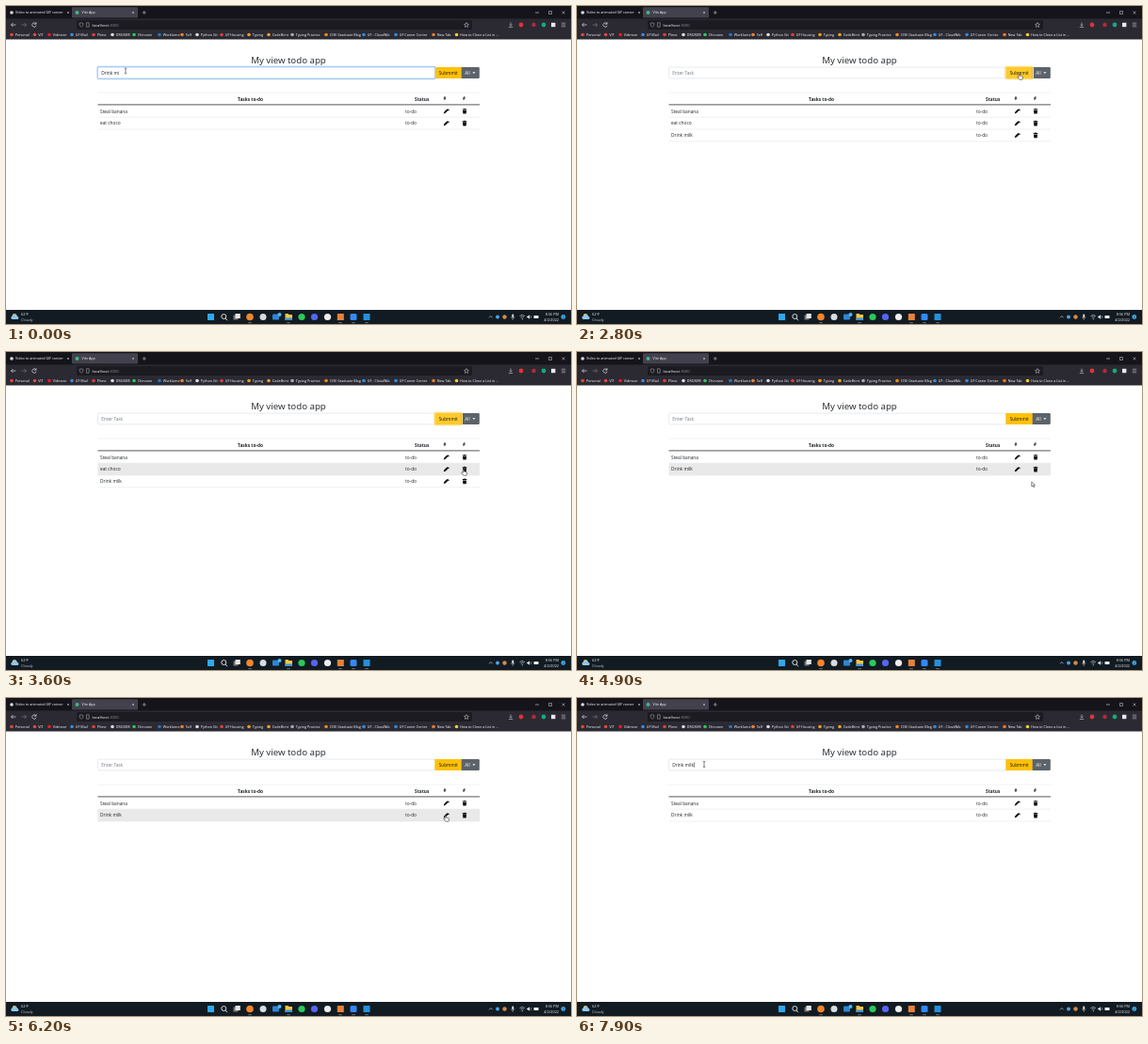
Recreate the animation shown at these times as an HTML page. Size 600 px wide and 338 px high, loop 8000 ms.

```html
<!DOCTYPE html>
<html lang="en">
<head>
<meta charset="utf-8">
<title>Todo app</title>
<style>
html, body { margin: 0; width: 100%; height: 100%; overflow: hidden; background: #fff; }
svg { display: block; width: 100%; height: 100%; font-family: "Open Sans", "Noto Sans", sans-serif; }
text { white-space: pre; }
</style>
</head>
<body>
<svg id="stage" viewBox="0 0 600 338"></svg>
<script>
const stage = document.getElementById('stage');
const LOOP = 8000, STEP = 100;

const text = (x, y, s, size = 4.8, fill = '#212529', more = '') =>
  `<text x="${x}" y="${y}" font-size="${size}" fill="${fill}" ${more}>${s}</text>`;
const rect = (x, y, w, h, fill, more = '') =>
  `<rect x="${x}" y="${y}" width="${w}" height="${h}" fill="${fill}" ${more}/>`;
const dot = (x, y, r, fill, more = '') =>
  `<circle cx="${x}" cy="${y}" r="${r}" fill="${fill}" ${more}/>`;
const line = (d, stroke, width = .7) =>
  `<path d="${d}" fill="none" stroke="${stroke}" stroke-width="${width}"/>`;
const shape = (d, fill, more = '') => `<path d="${d}" fill="${fill}" ${more}/>`;
const BOLD = 'font-weight="700"', MID = 'text-anchor="middle"';
const cross = (x, y, r) => line(`M${x - r} ${y - r}l${2 * r} ${2 * r}m0 ${-2 * r}l${-2 * r} ${2 * r}`, '#ddd', .5);

// [icon x, icon colour, label]
const bookmarks = [
  [6, '#e34a3a', 'Personal'], [30.5, '#e34a3a', 'VIT'], [46, '#f01d1d', 'Vidmoor'],
  [70, '#3b8be0', 'UF Mail'], [93, '#e0403c', 'Plimo'], [113, '#ddd', 'DRUMVE'],
  [136, '#2ec95c', 'Chirvane'], [163, '#2a78c8', 'Worklume'], [187, '#f08030', 'Self'],
  [203, '#ddd', 'Python Git'], [229, '#e0403c', 'UF Housing'], [258, '#f59a23', 'Typing'],
  [279, '#f0a030', 'CodeBrint'], [304, '#aaa', 'Typing Practice'], [340, '#f28a20', 'CISE Graduate Blog'],
  [380, '#2f8de0', 'UF - CloudNib'], [414, '#2f8de0', 'UF Career Centre'],
  [454, '#f07a28', 'New Tab'], [478.5, '#f0d030', 'How to Clone a List in ...']
];

function browser() {
  const ink = '#fbfbfe';
  return rect(0, 0, 600, 14, '#15141a') + rect(0, 13.5, 600, 22, '#2b2a33') +
    rect(70, 1.3, 70, 11.2, '#42414d', 'rx="1.2"') +
    dot(6, 7, 1.8, '#ddd') + text(10, 8.4, 'Video to animated GIF conver', 3.7, ink) + cross(66, 7, 1) +
    dot(75.5, 7, 2, '#41b883') + text(80.5, 8.4, 'Vite App', 3.7, ink) + cross(135, 7, 1) +
    line('M144.8 7h4M146.8 5v4', '#ddd', .5) +
    line('M562 7h4', '#ddd', .6) + line('M576.5 5.5h3v3h-3z', '#ddd', .5) + cross(592, 7, 1.5) +
    line('M10.5 20h-5m2-2l-2 2l2 2', '#ddd') + line('M16.5 20h5m-2-2l2 2l-2 2', '#777') +
    line('M31.7 18.7a2.2 2.2 0 1 0 .4 2M32 17.2v2h-2', '#ddd') +
    rect(75, 15, 420, 10, '#1c1b22', 'rx="1.2"') +
    line('M80 17.8l2 .6q0 3-2 4q-2-1-2-4z', '#bbb', .5) +
    line('M85.4 17.8h2.8v4.4h-2.8z', '#bbb', .5) +
    text(91.5, 21.6, 'localhost<tspan fill="#8f8f9d">:3000</tspan>', 4.2, ink) +
    line('M489 17.6l.7 1.6l1.8.2l-1.3 1.2l.3 1.8l-1.5-.9l-1.5.9l.3-1.8l-1.3-1.2l1.8-.2z', '#ddd', .5) +
    line('M536 17.5v3.6m-1.5-1.5l1.5 1.5l1.5-1.5M533.8 22.5h4.4', '#ccc', .6) +
    dot(547, 20, 2.4, '#e0313a') + dot(560.5, 20, 2.2, '#b8293a') + dot(571, 20, 2.4, '#16a87c') +
    rect(579, 17.8, 4.4, 4.4, '#e8e8ee') +
    line('M589.8 18.2h4.4m-4.4 1.8h4.4m-4.4 1.8h4.4', '#ddd', .5) +
    bookmarks.map(([x, c, s]) => dot(x, 30.5, 1.8, c) + text(x + 3.8, 31.9, s, 3.7, ink)).join('');
}

function taskbar() {
  const y = 330.5, ink = '#f2f2f2';
  return rect(0, 323, 600, 15, '#121b22') +
    dot(9, 329.3, 2.3, '#f5c542') +
    shape('M6.5 333a1.8 1.8 0 0 1 .5-3.5a2.6 2.6 0 0 1 5 .3a1.7 1.7 0 0 1 .5 3.2z', '#8fc7ee') +
    text(16, 329.4, '62°F', 3.9, ink) + text(16, 334.7, 'Cloudy', 3.9, '#c5c9cc') +
    rect(214, 327, 7, 7, '#2fa8ee') +
    dot(231.3, 330, 2.5, 'none', 'stroke="#eee" stroke-width=".9"') + line('M233 332l2 2.2', '#eee', .9) +
    rect(241.5, 328.5, 5, 5, '#777') + rect(243.5, 327, 5.3, 5, '#e4e4e4') +
    dot(259, y, 3.8, '#f5852a') + dot(273, y, 3.5, '#d8dce0') +
    rect(283, 327.5, 7, 6, '#2d86d6', 'rx="1"') + dot(290.5, 328, 2, '#53b6f0') +
    shape('M296.5 327h3l1 1h3.5v6h-7.5z', '#f8c642') + rect(296.5, 331.5, 7.5, 2.5, '#3a93d8') +
    dot(314, y, 3.6, '#2bc95a') + dot(327.5, y, 3.6, '#5865f2') + dot(341.5, y, 3.6, '#eee') +
    rect(351.8, 327, 7, 7, '#e8813a') + rect(365.5, 327, 7, 7, '#3488f5', 'rx="1.5"') +
    rect(379.5, 327, 7, 7, '#2490dc') +
    [259, 300, 355, 369, 383].map(x => rect(x - 1.8, 336.4, 3.6, .7, '#8b9aa5')).join('') +
    line('M513 331.3l1.8-1.8l1.8 1.8', '#eee', .6) +
    dot(522, y, 2, '#4aa3e8') + dot(529.5, y, 2.2, '#d98a45') +
    rect(537.3, 327.5, 1.9, 3.8, '#ddd', 'rx=".9"') + line('M536.2 330.5q2 3.6 4 0M538.2 332.4v1.4', '#ddd', .5) +
    line('M545.5 329.6q2.7-2.6 5.4 0M546.6 331q1.6-1.5 3.2 0', '#eee', .6) + dot(548.2, 332.6, .6, '#eee') +
    shape('M553.2 329.7h1.2l1.6-1.5v4.6l-1.6-1.5h-1.2z', '#eee') + line('M557 329q1.3 1.5 0 3', '#eee', .5) +
    rect(560.5, 329, 5, 3, '#eee', 'rx=".5"') +
    text(587, 329.3, '8:56 PM', 3.8, ink, 'text-anchor="end"') +
    text(587, 334.7, '4/2/2022', 3.8, ink, 'text-anchor="end"') +
    dot(591.8, y, 2.4, '#43a9e8') + text(591.8, 331.6, '2', 3, '#10202c', MID);
}

const rowTop = i => 105.3 + 12.85 * i;
const pencil = y => shape(`M464.7 ${y + 2.6}l.6-2l3-3l1.4 1.4l-3 3zM468.7 ${y - 1.8}l.7-.7l1.4 1.4l-.7.7z`, '#111');
const trash = y => shape(`M484.7 ${y - 2.4}h1.3l.4-.5h1.2l.4.5h1.3v.9h-4.6zM485 ${y - 1.1}h4l-.3 3.9h-3.4z`, '#111');

function table(tasks, hover) {
  const rule = (y, color, w) => line(`M97.5 ${y}h405.5`, color, w);
  return rule(92, '#dee2e6', .5) +
    text(259.5, 100.6, 'Tasks to-do', 4.8, '#212529', BOLD + MID) +
    text(441.7, 100.6, 'Status', 4.8, '#212529', BOLD + MID) +
    [466, 486.5].map(x => text(x, 100.4, '#', 4.4, '#212529', BOLD + MID)).join('') +
    tasks.map((task, i) => {
      const y = rowTop(i), mid = y + 6.5;
      return (i === hover ? rect(97.5, y, 405.5, 12.85, '#e9e9e9') : '') + rule(y + 12.85, '#dee2e6', .5) +
        text(100, mid + 1.8, task) + text(424, mid + 1.8, 'to-do') + pencil(mid) + trash(mid);
    }).join('') + rule(104.9, '#2a2d30', .8);
}

function form(value, focus, caret, pressed) {
  const glow = (x, w, color) => rect(x - .6, 64.4, w + 1.2, 13.2, 'none', `rx="1.6" stroke="${color}" stroke-width="1.2"`);
  return rect(97.6, 65.1, 357.8, 11.8, '#fff', `rx="1.2" stroke="${focus ? '#86b7fe' : '#ced4da'}" stroke-width=".5"`) +
    rect(455.4, 65, 28.4, 12, pressed ? '#ffca2c' : '#ffc107') +
    shape('M483.6 65h18a1.2 1.2 0 0 1 1.2 1.2v9.6a1.2 1.2 0 0 1-1.2 1.2h-18z', '#5c636a') +
    (focus ? glow(97.6, 357.8, '#a9cdfb') : '') + (pressed ? glow(455.4, 28.4, '#ffdf83') : '') +
    text(101.2, 72.8, value || 'Enter Task', 4.8, value ? '#212529' : '#747b82') +
    (caret ? line('M124.6 68.2v5.6', '#111', .5) : '') +
    text(469.7, 72.7, 'Submmit', 4.7, '#111', MID) + text(487.3, 72.7, 'All', 4.8, '#fff') +
    shape('M495.4 70.3h3l-1.5 1.6z', '#fff');
}

// pointer path: [time, x, y]
const path = [
  [0, 127, 69], [1200, 127, 69], [1500, 260, 62], [1900, 440.6, 64.6], [2400, 470, 72], [3000, 470, 72],
  [3300, 485, 121], [3600, 486, 125], [4400, 486, 125], [4600, 486, 130], [4900, 482.8, 138],
  [5200, 477, 147], [5600, 467, 125], [6500, 467, 125], [7100, 240, 82], [7500, 135, 70.5], [LOOP, 135, 70.5]
];

function pointerAt(t) {
  const i = path.findIndex(p => p[0] > t);
  const [t0, x0, y0] = path[i - 1], [t1, x1, y1] = path[i];
  const u = (t - t0) / (t1 - t0), k = u * u * (3 - 2 * u);
  return [x0 + (x1 - x0) * k, y0 + (y1 - y0) * k];
}

function pointer([x, y], rows) {
  const inBar = y >= 65 && y < 77, row = Math.floor((y - rowTop(0)) / 12.85);
  const onIcon = row >= 0 && row < rows && (Math.abs(x - 467) < 4 || Math.abs(x - 487) < 4);
  let art;
  if (inBar && x > 97 && x < 455)
    art = line('M-1.2-3q1.2 0 1.2.6v4.8q0 .6-1.2.6M1.2-3q-1.2 0-1.2.6M0 2.4q0 .6 1.2.6', '#222', .6);
  else if (inBar && x >= 455 && x < 503 || onIcon)
    art = shape('M-.7 0q.7-.7 1.2 0v2.1l2.3.5q.8.2.7 1l-.5 2.6h-3.2l-2-2.7q-.1-.8.7-.7l.8.6z', '#fff', 'stroke="#111" stroke-width=".5"');
  else
    art = shape('M0 0v5l1.2-1.1l.8 1.9l.9-.4l-.8-1.8h1.6z', '#fff', 'stroke="#111" stroke-width=".5"');
  return `<g transform="translate(${x} ${y})">${art}</g>`;
}

function entry(t) {
  if (t < 2400) return 'Drink mi' + 'lk'.slice(0, t < 200 ? 0 : t < 400 ? 1 : 2);
  return t < 6600 ? '' : 'Drink milk';
}

function tasksAt(t) {
  if (t < 2500) return ['Steal banana', 'eat choco'];
  return t < 3800 ? ['Steal banana', 'eat choco', 'Drink milk'] : ['Steal banana', 'Drink milk'];
}

stage.innerHTML = rect(0, 0, 600, 338, '#fff') + browser() + taskbar() +
  text(300, 60.8, 'My view todo app', 9.7, '#212529', MID) + '<g id="app"></g>';
const app = document.getElementById('app');
let shown = -1;

function draw(now) {
  const t = Math.floor(now % LOOP / STEP) * STEP;
  if (t !== shown) {
    shown = t;
    const tasks = tasksAt(t);
    // row shading trails the pointer slightly
    const hover = Math.floor((pointerAt(Math.max(0, t - 300))[1] - rowTop(0)) / 12.85);
    app.innerHTML = table(tasks, hover) +
      form(entry(t), t < 2400, t >= 7800, t >= 2300 && t < 4200) + pointer(pointerAt(t), tasks.length);
  }
}

const start = performance.now();
function tick() {
  draw(performance.now() - start);
  requestAnimationFrame(tick);
}
tick();
</script>
</body>
</html>
```
